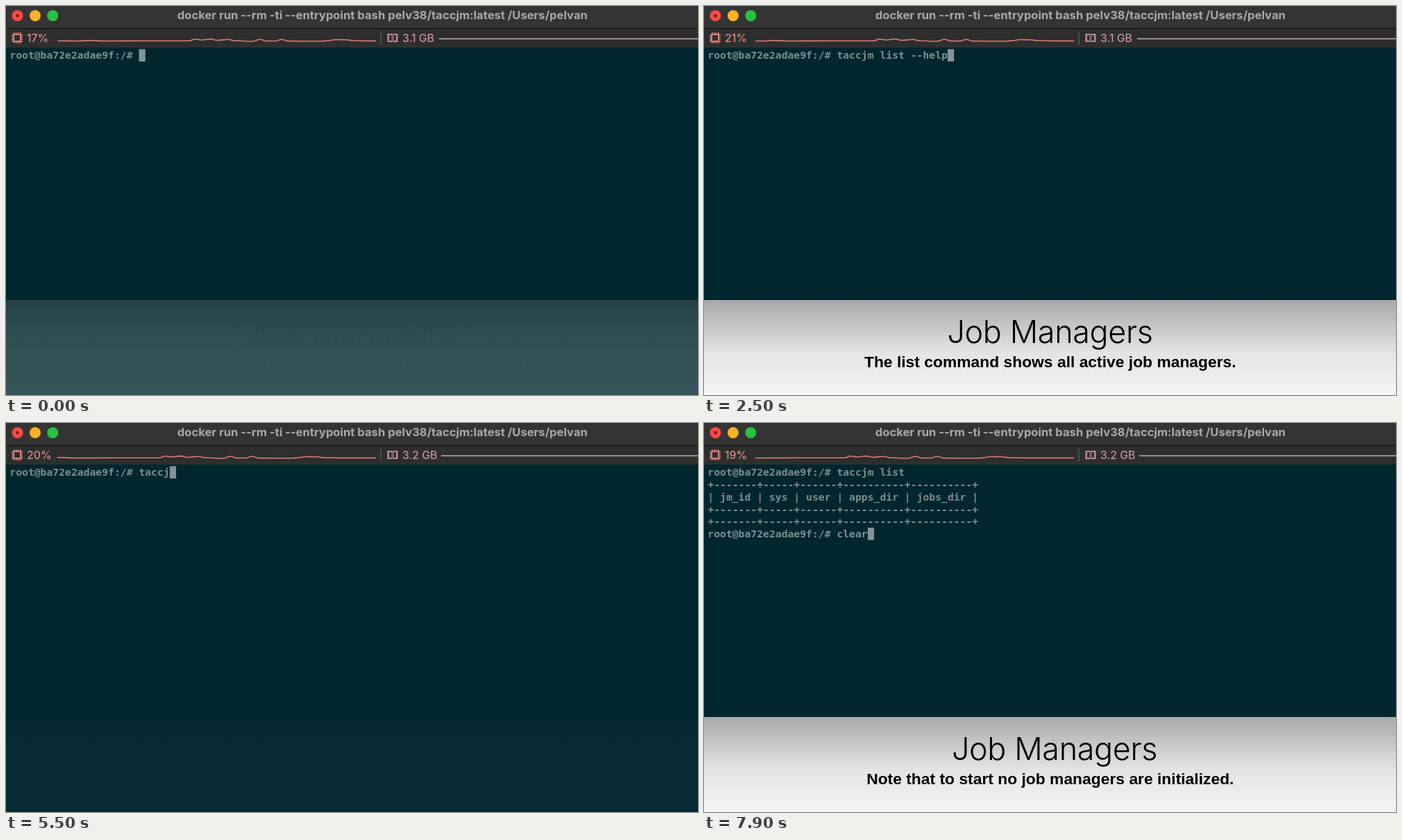
An HTML page with a canvas that plays this animation: 997x561 px, repeating every 8000 ms.

```html
<!DOCTYPE html>
<html lang="en">
<head>
<meta charset="utf-8">
<title>Terminal: job managers</title>
<style>
html, body { margin: 0; width: 100%; height: 100%; overflow: hidden; background: #00262e; }
canvas { display: block; }
</style>
</head>
<body>
<canvas id="stage" width="997" height="561"></canvas>
<script>
const ctx = document.getElementById('stage').getContext('2d');
const LOOP = 8000;
const SANS = 'Inter, Roboto, sans-serif';
const BOLD = '"Liberation Sans", Arial, sans-serif';
const MONO = '"DejaVu Sans Mono", Menlo, monospace';
const CELL = 8.86, ROW = 17.73;
const PROMPT = 'root@ba72e2adae9f:/# ';
const indent = ' '.repeat(34);

const HELP = [
  'Usage: taccjm list [OPTIONS]',
  '',
  '  List TACC Job Managers',
  '',
  '  List available Job Managers on server, along with info: jm_id, system, user,',
  '  application directory, and jobs directory. Can filter results on any column',
  '  by specifying the column in the `--search` option and the regular expression',
  '  to match on in the `--match` option.',
  '',
  'Options:',
  '  -s, --search [jm_id|sys|user|apps_dir|jobs_dir]',
  indent + 'Column to search.  [default: jm_id]',
  '  -m, --match TEXT'.padEnd(34) + 'Regular expression to match.  [default: .]',
  '  --help'.padEnd(34) + 'Show this message and exit.'
];
const RULE = '+' + [7, 5, 6, 10, 10].map(n => '-'.repeat(n) + '+').join('');
const TABLE = [RULE, '| jm_id | sys | user | apps_dir | jobs_dir |', RULE, RULE];

// One screenful each: a command, its output, then "clear".
const SCREENS = [
  { cmd: 'taccjm list --help', start: 570, step: 105, enter: 2650, show: 2770, out: HELP, clear: 3700 },
  { cmd: 'taccjm list', start: 4850, step: 115, enter: 6350, show: 6800, out: TABLE, clear: 7300 }
];
const SECOND_SCREEN = 4450;

const CAPTIONS = [
  { from: -110, to: 3920, x: 498.5, text: 'The list command shows all active job managers.' },
  { from: 5490, to: 9500, x: 505, text: 'Note that to start no job managers are initialized.' }
];
const FADE = 500;

// Peaks of the processor graph at time zero.
const LOAD = [
  [40, 50.3], [74, 50.3], [105, 50.5], [120, 49.8], [140, 50.5], [200, 50.2], [264, 50.3],
  [272, 47.8], [282, 49], [295, 47.6], [304, 49.5], [320, 48.3], [330, 50], [354, 51],
  [366, 48.3], [376, 50.5], [388, 50.5], [397, 48.2], [407, 50.6], [455, 50.8],
  [464, 50], [475, 48.5], [490, 48.8], [501, 50], [530, 50.4], [620, 50.4]
];

const clamp = v => Math.max(0, Math.min(1, v));

function text(str, x, y, font, color, align = 'left', spacing = 0) {
  ctx.font = font;
  ctx.fillStyle = color;
  ctx.textAlign = align;
  ctx.letterSpacing = spacing + 'px';
  ctx.fillText(str, x, y);
}

function rect(x, y, w, h, color) {
  ctx.fillStyle = color;
  ctx.fillRect(x, y, w, h);
}

function dot(x, y, r, color) {
  ctx.fillStyle = color;
  ctx.beginPath();
  ctx.arc(x, y, r, 0, 2 * Math.PI);
  ctx.fill();
}

function drawTitleBar() {
  rect(0, 0, 997, 32, '#343434');
  rect(0, 32, 997, 1, '#0c0c0c');
  dot(16.5, 14, 8, '#fb4a46');
  dot(16.5, 14, 2.2, '#7c100d');
  dot(42, 14, 8, '#fdb124');
  dot(67.3, 14, 8, '#29c140');
  text('docker run --rm -ti --entrypoint bash pelv38/taccjm:latest /Users/pelvan',
    542.3, 19.3, '700 16.6px ' + SANS, '#a9a9a9', 'center');
}

function drawChip(color) {
  for (let i = 0; i < 4; i++) {
    const p = 3.2 + i * 3;
    rect(8 + p, 38, 1.4, 16, color);
    rect(8, 38 + p, 16, 1.4, color);
  }
  rect(10, 40, 12, 12, color);
  rect(12, 42, 8, 8, '#2e2e2e');
}

function drawMemoryIcon(color) {
  rect(549.5, 40, 15, 12, color);
  rect(552, 42, 3.6, 8, '#2e2e2e');
  rect(558.4, 42, 3.6, 8, '#2e2e2e');
  rect(556.6, 40, 0.8, 12, '#2e2e2e');
}

function drawLoad(t) {
  ctx.save();
  ctx.beginPath();
  ctx.rect(74, 36, 459, 22);
  ctx.clip();
  ctx.translate(-7.75 * t / 1000, 0);
  ctx.beginPath();
  ctx.moveTo(...LOAD[0]);
  for (let i = 1; i < LOAD.length; i++) {
    const [x0, y0] = LOAD[i - 1], [x, y] = LOAD[i], mid = (x0 + x) / 2;
    ctx.bezierCurveTo(mid, y0, mid, y, x, y);
  }
  ctx.strokeStyle = '#d87d77';
  ctx.lineWidth = 1.6;
  ctx.stroke();
  ctx.restore();
}

function drawStatus(t) {
  const load = t < 1800 ? 17 : t < 4700 ? 21 : t < 6700 ? 20 : 19;
  const later = t >= 2700;
  const font = '500 15.8px ' + SANS;
  rect(0, 33, 997, 27, '#2e2e2e');
  drawChip('#d8827c');
  text(load + '%', 30, 52, font, '#d58b87');
  drawLoad(t);
  rect(539.5, 37, 1, 19, '#696969');
  drawMemoryIcon('#bd8aa0');
  text(later ? '3.2 GB' : '3.1 GB', 571, 52, font, '#c18fa6');
  const x = later ? 627 : 624;
  rect(x, 46.5, 997 - x, 1.6, '#bfa3b1');
}

function typed(str, start, step, t) {
  return str.slice(0, Math.max(0, Math.floor((t - start) / step)));
}

function terminalLines(t) {
  const s = SCREENS[t < SECOND_SCREEN ? 0 : 1];
  const lines = [PROMPT + typed(s.cmd, s.start, s.step, t)];
  if (t >= s.show) lines.push(...s.out, PROMPT + typed('clear', s.clear, 106, t));
  else if (t >= s.enter) lines.push('');
  return lines;
}

function drawTerminal(t) {
  rect(0, 60, 997, 501, '#00262e');
  const lines = terminalLines(t);
  lines.forEach((line, i) =>
    text(line, 5.3, 76.4 + i * ROW, '700 14.72px ' + MONO, '#7a9093'));
  const last = lines.length - 1;
  rect(5.5 + lines[last].length * CELL, 62.3 + last * ROW, 9.2, 17.7, '#839496');
}

function drawCaption(t, c) {
  const shown = clamp(Math.min(t - c.from, c.to - t) / FADE);
  if (!shown) return;
  const shade = ctx.createLinearGradient(0, 424, 0, 561);
  shade.addColorStop(0, '#a8a9ab');
  shade.addColorStop(0.55, '#e3e3e4');
  shade.addColorStop(1, '#f5f5f5');
  ctx.globalAlpha = shown;
  rect(0, 424, 997, 137, shade);
  ctx.globalAlpha = shown ** 2.8; // lettering lags behind its panel
  text('Job Managers', c.x, 486, '300 45px ' + SANS, '#000', 'center', -0.4);
  text(c.text, 498.8, 520.5, '700 22.85px ' + BOLD, '#000', 'center');
  ctx.globalAlpha = 1;
}

function draw(now) {
  const t = now % LOOP;
  drawTerminal(t);
  drawTitleBar();
  drawStatus(t);
  CAPTIONS.forEach(c => drawCaption(t, c));
}

const begin = performance.now();
function tick() {
  draw(performance.now() - begin);
  requestAnimationFrame(tick);
}
tick();
</script>
</body>
</html>
```
